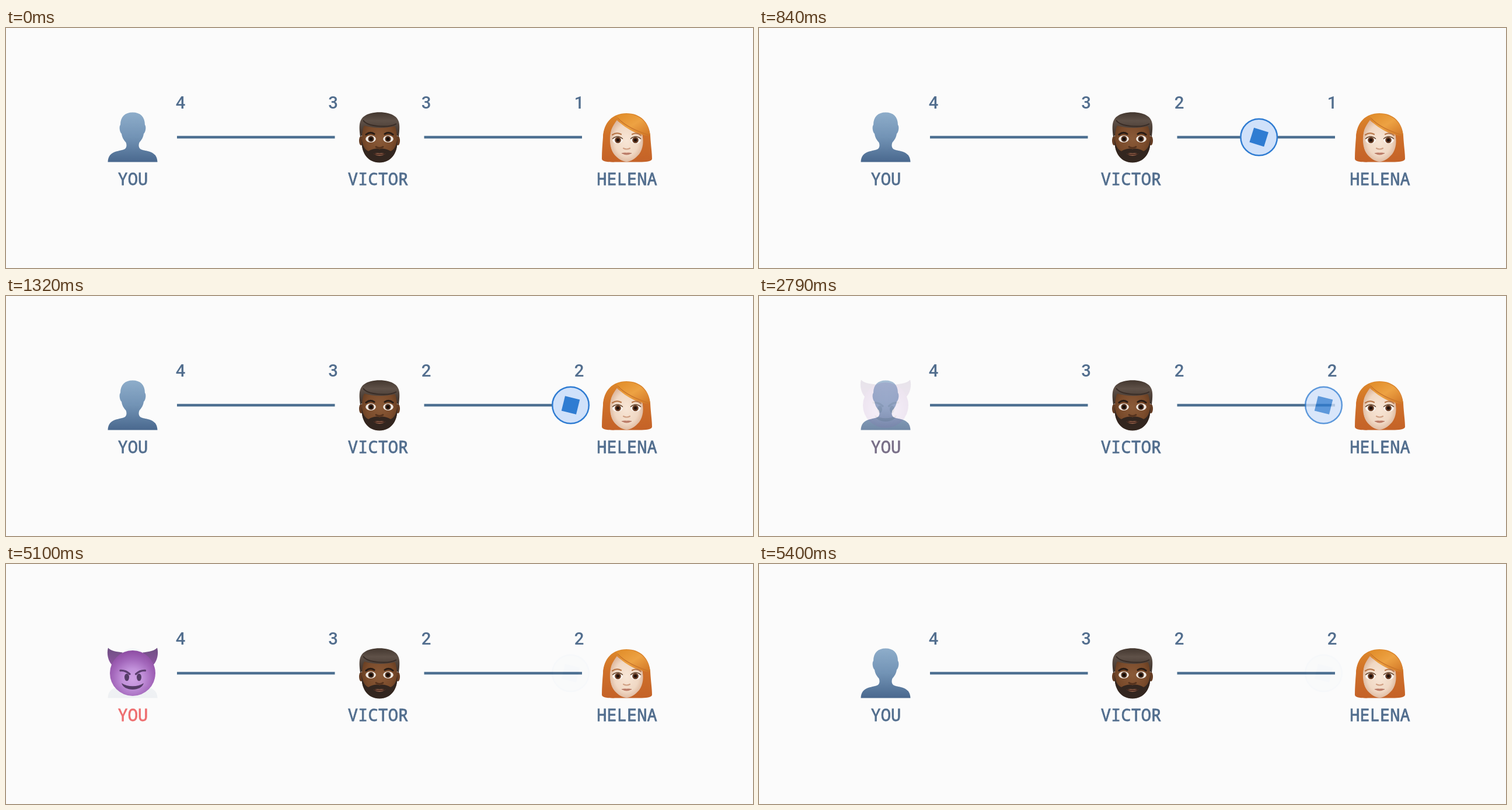
These frames come from a looping animation (1280 px wide and 411 px high, 6120 ms). An HTML page:

```html
<!DOCTYPE html>
<html lang="en">
<head>
<meta charset="utf-8">
<title>Payment channels</title>
<style>
  html, body { margin: 0; width: 100%; height: 100%; overflow: hidden; background: #fbfbfb; }
  svg { display: block; width: 100vw; height: 100vh; }
  text { color: #526e8e; fill: currentColor; font-weight: 500; text-anchor: middle; }
  .name { font-family: "Noto Sans Mono", "DejaVu Sans Mono", monospace; font-size: 28.7px; stroke: currentColor; stroke-width: .8; }
  .count { font-family: Roboto, Arial, sans-serif; font-size: 29.3px; }
</style>
</head>
<body>
<svg viewBox="0 0 1280 411">
  <defs>
    <linearGradient id="gUser" x1="0" y1="0" x2="0" y2="1">
      <stop offset="0" stop-color="#8eadca"/><stop offset=".5" stop-color="#7293b5"/><stop offset="1" stop-color="#49688e"/>
    </linearGradient>
    <radialGradient id="gImp" cx=".5" cy=".62" r=".62">
      <stop offset="0" stop-color="#c990e2"/><stop offset=".35" stop-color="#b77bd4"/>
      <stop offset=".7" stop-color="#9147ae"/><stop offset="1" stop-color="#76258f"/>
    </radialGradient>
    <linearGradient id="gHorn" x1="0" y1="0" x2="0" y2="1">
      <stop offset="0" stop-color="#4d2765"/><stop offset="1" stop-color="#76308e"/>
    </linearGradient>
    <radialGradient id="gSkin" cx=".5" cy=".45" r=".6">
      <stop offset="0" stop-color="#8a5a38"/><stop offset=".65" stop-color="#7a4b2b"/><stop offset="1" stop-color="#60391f"/>
    </radialGradient>
    <linearGradient id="gDark" x1="0" y1="0" x2="0" y2="1">
      <stop offset="0" stop-color="#43372f"/><stop offset=".35" stop-color="#5f5148"/><stop offset="1" stop-color="#3a2e27"/>
    </linearGradient>
    <radialGradient id="gPale" cx=".5" cy=".5" r=".6">
      <stop offset="0" stop-color="#f8e6d6"/><stop offset=".6" stop-color="#f0d8c4"/><stop offset="1" stop-color="#d5a98c"/>
    </radialGradient>
    <linearGradient id="gHair" x1="0" y1="0" x2="0" y2="1">
      <stop offset="0" stop-color="#dc862a"/><stop offset=".45" stop-color="#cf7029"/><stop offset="1" stop-color="#c46228"/>
    </linearGradient>
    <linearGradient id="gFringe" x1="0" y1="0" x2="1" y2="1">
      <stop offset="0" stop-color="#df8a26"/><stop offset=".5" stop-color="#eda243"/><stop offset="1" stop-color="#d07425"/>
    </linearGradient>
  </defs>

  <path d="M293 187H563.5M716.5 187H987" stroke="#4d7091" stroke-width="4.300"/>

  <g id="user">
    <path fill="url(#gUser)" d="M217 144.500C230 144.500 238 152 238 166C240.500 168 239.500 178 236 181C235 188 232 192 228.500 196C227 200 227 204 230 207C237 212 258.500 208 259.500 229.500H174.500C175.500 208 197 212 204 207C207 204 207 200 205.500 196C202 192 199 188 198 181C194.500 178 193.500 168 196 166C196 152 204 144.500 217 144.500Z"/>
  </g>

  <g id="imp">
    <g id="horn">
      <path fill="url(#gHorn)" d="M175 143.500C180 149 190 150.500 200 151.500L183 174C175 168 172 153 175 143.500Z"/>
    </g>
    <use href="#horn" transform="matrix(-1 0 0 1 434 0)"/>
    <circle cx="217" cy="187" r="39" fill="url(#gImp)"/>
    <g fill="#321347">
      <ellipse cx="207" cy="194" rx="4" ry="6.300"/>
      <ellipse cx="228" cy="194" rx="4" ry="6.300"/>
      <path d="M198 204C208 211 226 211 236 204C234 211 226 215 217 215C208 215 200 211 198 204Z"/>
    </g>
    <path d="M196 182.500Q205 182 212 188.500M238.500 182.500Q229.500 182 222.500 188.500" fill="none" stroke="#3b1652" stroke-width="3.300" stroke-linecap="round"/>
  </g>

  <g id="man">
    <ellipse cx="608.500" cy="193" rx="3.500" ry="8" fill="#653d24"/>
    <ellipse cx="671.500" cy="193" rx="3.500" ry="8" fill="#653d24"/>
    <path fill="url(#gSkin)" d="M610 168C612 154 668 154 670 168V198C670 217 657 229 640 229C623 229 610 217 610 198Z"/>
    <path fill="#33261f" d="M609.500 190C611 201 614 208 621 211C626 208 633 205 640 207.500C647 205 654 208 659 211C666 208 669 201 670.500 190C672 214 660 230.500 640 230.500C620 230.500 608 214 609.500 190Z"/>
    <path fill="url(#gDark)" d="M607 186C605 170 604 158 614 151C625 142 655 142 666 151C676 158 675 170 673 186L670 184C669 177 669 172 666 168C650 172 630 172 614 167C611 172 611 178 610 184Z"/>
    <path d="M612 158C619 169 655 172 669 164" fill="none" stroke="#382c26" stroke-width="2"/>
    <path d="M617 182.500Q624 177 631 181.500M649 181.500Q656 177 663 182.500" fill="none" stroke="#2b1d15" stroke-width="3.200" stroke-linecap="round"/>
    <g fill="#f0e9e2"><ellipse cx="625" cy="190" rx="8.800" ry="6"/><ellipse cx="655" cy="190" rx="8.800" ry="6"/></g>
    <g fill="#4b2d1d"><circle cx="625.500" cy="190" r="5"/><circle cx="654.500" cy="190" r="5"/></g>
    <g fill="#130c09"><circle cx="625.500" cy="190" r="2.600"/><circle cx="654.500" cy="190" r="2.600"/></g>
    <path d="M634 203.500Q640 207.500 646 203.500" fill="none" stroke="#55331e" stroke-width="2.800" stroke-linecap="round"/>
    <path fill="#94624a" d="M630 215.500Q636 213 640 214.500Q644 213 650 215.500Q640 222.500 630 215.500Z"/>
    <path d="M631 215.500Q640 217.500 649 215.500" fill="none" stroke="#3d211a" stroke-width="1.300"/>
  </g>

  <g id="woman">
    <path fill="url(#gHair)" d="M1063 146C1088 146 1102 162 1104 184C1105 202 1107 213 1107 224C1107 229 1092 230 1080 229.500H1047C1035 230 1021 229.500 1021 224C1021 211 1022 200 1023 187C1024 162 1039 146 1063 146Z"/>
    <path fill="url(#gPale)" d="M1045 156C1057 168 1075 178 1090 181C1093 194 1092 206 1085 216C1078 224 1070 229 1063.500 229C1057 229 1048 224 1041 215C1034 205 1033 187 1038 170Z"/>
    <path fill="url(#gFringe)" d="M1044 151C1068 140 1101 152 1104 185C1086 184 1058 174 1044 151Z"/>
    <path d="M1047 153C1062 170 1086 178 1103 184" fill="none" stroke="#ca752a" stroke-width="1.500"/>
    <path fill="url(#gHair)" d="M1046 150C1032 157 1023 171 1023 191C1023 204 1021 218 1027 227L1042 217C1035 207 1033 193 1035 183C1037 171 1042 164 1049 155Z"/>
    <path d="M1039 183Q1046 178 1054 182M1073 182Q1081 178 1088 184" fill="none" stroke="#b8784b" stroke-width="2.200" stroke-linecap="round"/>
    <g fill="#fbf7f3"><ellipse cx="1048" cy="192" rx="8.800" ry="6"/><ellipse cx="1079" cy="192" rx="8.800" ry="6"/></g>
    <g fill="#6a3e26"><circle cx="1048.500" cy="192" r="5.300"/><circle cx="1078.500" cy="192" r="5.300"/></g>
    <g fill="#21110b"><circle cx="1048.500" cy="192" r="2.800"/><circle cx="1078.500" cy="192" r="2.800"/></g>
    <path d="M1039 190Q1048 182 1057 190M1070 190Q1079 182 1088 190" fill="none" stroke="#604029" stroke-width="1.300"/>
    <path d="M1058 206Q1063.500 209 1069 206" fill="none" stroke="#d0a084" stroke-width="2.200" stroke-linecap="round"/>
    <path fill="#c88a75" d="M1055 214.500Q1060 212.500 1063.500 213.500Q1067 212.500 1072 214.500Q1063.500 220.500 1055 214.500Z"/>
    <path d="M1055 214.500Q1063.500 216.500 1072 214.500" fill="none" stroke="#a86b59" stroke-width="1"/>
  </g>

  <text id="you" class="name" x="217.300" y="269">YOU</text>
  <text class="name" x="637.500" y="269">VICTOR</text>
  <text class="name" x="1064" y="269">HELENA</text>

  <text class="count" x="299" y="137.500">4</text>
  <text class="count" x="560.500" y="137.500">3</text>
  <text id="sent" class="count" x="720" y="137.500">3</text>
  <text id="received" class="count" x="982" y="137.500">1</text>

  <g id="coin">
    <circle r="31.300" fill="#d0e1fa" stroke="#2f7cd2" stroke-width="2.500"/>
    <rect id="token" x="-13" y="-13" width="26" height="26" fill="#2f7cd2"/>
  </g>
</svg>

<script>
  const LOOP = 6120, STEP = 30;
  const BLUE = [82, 110, 142], RED = [250, 110, 110];
  const el = id => document.getElementById(id);
  const user = el('user'), imp = el('imp'), you = el('you');
  const sent = el('sent'), received = el('received');
  const coin = el('coin'), token = el('token');

  const span = (t, from, to) => Math.min(1, Math.max(0, (t - from) / (to - from)));

  // Ease-in-out: cubic-bezier(.42, 0, .58, 1)
  function ease(x) {
    let lo = 0, hi = 1;
    for (let i = 0; i < 24; i++) {
      const s = (lo + hi) / 2, r = 1 - s;
      if (1.26 * r * r * s + 1.74 * r * s * s + s * s * s < x) lo = s; else hi = s;
    }
    return lo * lo * (3 - 2 * lo);
  }

  // A faint trace of the coin stays until the loop restarts.
  function coinOpacity(t, fade) {
    if (t < 450) return 0;
    return Math.max(0.02, span(t, 400, 600) * (1 - fade));
  }

  function draw(t) {
    const move = ease(span(t, 355, 1305));
    const turn = span(t, 2710, 3060), back = span(t, 5030, 5400);

    coin.setAttribute('transform', `translate(${737.5 + 230 * move} 187)`);
    coin.setAttribute('opacity', coinOpacity(t, turn));
    token.setAttribute('transform', `rotate(${14 - 180 * (1 - move)})`);

    // Each face leaves at a steady rate and arrives eased.
    user.setAttribute('opacity', 1 - turn + ease(back));
    imp.setAttribute('opacity', ease(turn) - back);
    const mix = turn - ease(back);
    you.style.color = `rgb(${BLUE.map((c, i) => Math.round(c + (RED[i] - c) * mix))})`;

    sent.textContent = t < 450 ? '3' : '2';
    received.textContent = t < 1080 ? '1' : '2';
  }

  const start = performance.now();
  function tick() {
    const t = (performance.now() - start) % LOOP;
    draw(Math.floor(t / STEP) * STEP);
    requestAnimationFrame(tick);
  }
  tick();
</script>
</body>
</html>
```
